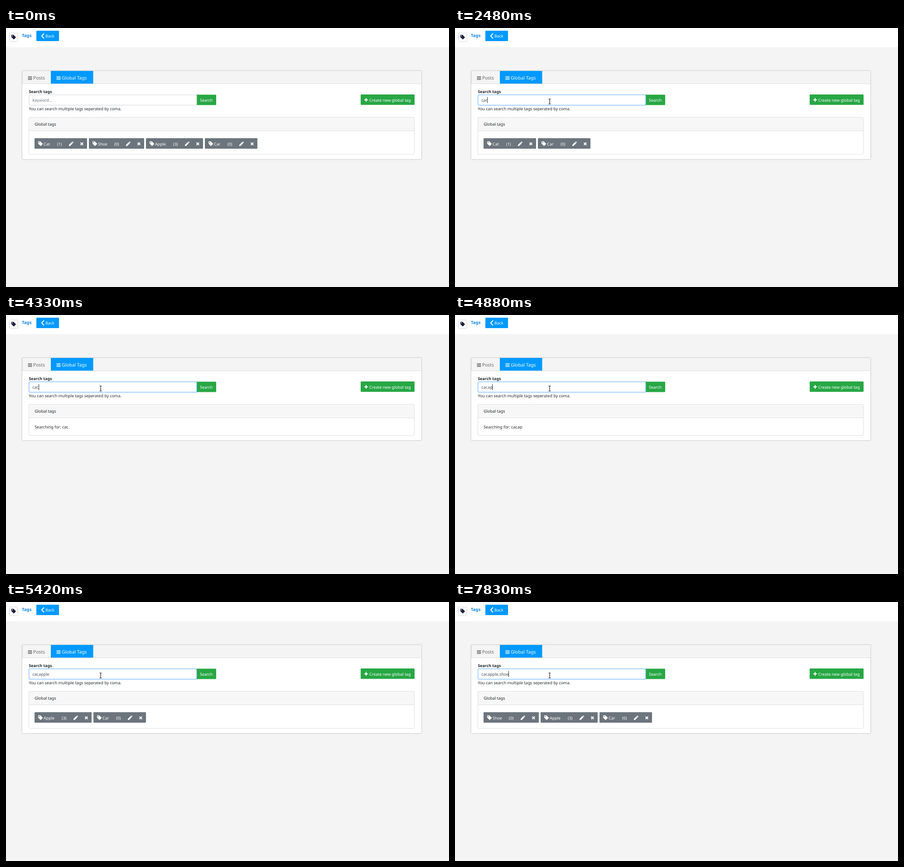
An HTML page that plays this animation: 978x573 px, repeating every 8 s.

```html
<!DOCTYPE html>
<html lang="en">
<head>
<meta charset="utf-8">
<title>Tag search</title>
<style>
  html, body { margin: 0; width: 100%; height: 100%; overflow: hidden; background: #f4f4f4; }
  svg { display: block; width: 978px; height: 573px; }
  text { font: 8.95px "Noto Sans", "Open Sans", sans-serif; fill: #212529; text-rendering: geometricPrecision; white-space: pre; }
  .bold { font-weight: 700; font-size: 8.8px; }
  .title { font-weight: 700; font-size: 9.6px; fill: #1585dc; }
  .tab { font-size: 10.2px; fill: #666; }
  .white { fill: #fff; }
  .hint { fill: #6c757d; }
  .typed { fill: #495057; }
  .line { fill: none; stroke-width: 1; stroke: #dfdfdf; }
  .blue { fill: #0099ff; }
  .green { fill: #28a745; }
  .card { fill: #fff; filter: drop-shadow(0 0.5px 1.5px rgba(0, 0, 0, .32)); }
</style>
</head>
<body>
<svg viewBox="0 0 978 573">
  <defs>
    <path id="tag" fill-rule="evenodd" d="M0 4.9V1Q0 0 1 0H4.9L9.9 5Q10.4 5.7 9.8 6.3L6.3 9.8Q5.7 10.4 5 9.9ZM2.3 1.2a1.1 1.1 0 1 0 .01 0Z"/>
    <path id="pencil" d="M0 10V7.5L6 1.5 8.5 4 2.5 10ZM6.6.9 7.3.2Q8-.2 8.6.4L9.6 1.4Q10.2 2 9.7 2.7L9.1 3.4Z"/>
    <path id="cross" d="M.8.8 6.4 6.4M6.4.8.8 6.4" fill="none" stroke="#fff" stroke-width="2.1"/>
    <path id="menu" d="M0 .7H9M0 3.7H9M0 6.7H9" fill="none" stroke-width="1.4"/>
  </defs>

  <rect width="978" height="573" fill="#f4f4f4"/>
  <rect width="978" height="42.5" fill="#fff"/>
  <rect class="card" x="8.5" y="12" width="17" height="17"/>
  <use href="#tag" x="11.7" y="15" fill="#1f1f3d"/>
  <text class="title" x="35" y="20">Tags</text>
  <rect class="blue" x="67" y="6" width="50" height="23" rx="1.5"/>
  <path d="M84 12 78.8 17.5 84 23" fill="none" stroke="#fff" stroke-width="1.9"/>
  <text class="white" x="87" y="21.3">Back</text>

  <rect class="card" id="outer" x="36" y="95" width="881" height="195"/>
  <rect x="36" y="95" width="881" height="28" fill="#f4f4f4"/>
  <path class="line" d="M36 123.5H917M36.5 95V123"/>
  <use href="#menu" x="48.5" y="107" stroke="#555"/>
  <text class="tab" x="60" y="114">Posts</text>
  <rect class="blue" x="99" y="95" width="93.5" height="28"/>
  <use href="#menu" x="111.5" y="107" stroke="#fff"/>
  <text class="tab white" x="123.3" y="114">Global Tags</text>

  <text class="bold" x="50.5" y="144.3">Search tags</text>
  <path class="green" d="M420 147.5H462.5Q464 147.5 464 149V169Q464 170.5 462.5 170.5H420Z"/>
  <text class="white" x="428" y="163.3">Search</text>
  <rect id="ring" x="49.8" y="146.8" width="372.4" height="24.9" rx="3" fill="#007bff" fill-opacity=".28"/>
  <rect id="field" x="51" y="148" width="370" height="22.5" rx="1.8" fill="#fff" stroke="#ced4da"/>
  <text class="hint" id="hint" x="58.2" y="163.3">Keyword...</text>
  <text class="typed" id="typed" x="58.3" y="163.3"></text>
  <rect id="caret" y="153" width="1" height="13" fill="#222"/>
  <text x="50.5" y="182">You can search multiple tags seperated by coma.</text>
  <rect class="green" x="783" y="147" width="119" height="23" rx="1.5"/>
  <path d="M791 159H799M795 155V163" stroke="#fff" stroke-width="2"/>
  <text class="white" x="802" y="162.8">Create new global tag</text>

  <path d="M51 227V199Q51 197.5 52.5 197.5H900Q901.5 197.5 901.5 199V227Z" fill="#f7f7f7"/>
  <path class="line" d="M51 227.5H902"/>
  <rect class="line" id="inner" x="50.5" y="197.5" width="851" height="82" rx="2"/>
  <text x="63.2" y="216.3">Global tags</text>
  <text id="status" x="63.2" y="250.9"></text>
  <g id="tags"></g>

  <g id="pointer">
    <circle id="glow" r="10" fill="#fbf04d" fill-opacity=".85"/>
    <path id="arrow" d="M0 0V14L3.3 11 5.5 16 7.6 15 5.4 10.2H10Z" fill="#fff" stroke="#000" stroke-width=".9"/>
    <path id="beam" d="M-2.5-5H-.8L0-4.4.8-5H2.5M0-4.4V5.4M-2.5 6H-.8L0 5.4.8 6H2.5" fill="none" stroke="#111" stroke-width="1.1"/>
  </g>
</svg>
<script>
const LOOP = 8000;
const $ = id => document.getElementById(id);
const show = (id, on) => $(id).style.display = on ? '' : 'none';

const tagInfo = { Cat: [116, 1], Shoe: [122, 0], Apple: [126, 3], Car: [116, 0] };
for (const [name, [w, count]] of Object.entries(tagInfo)) {
  $('tags').insertAdjacentHTML('beforeend', `<g id="tag${name}" fill="#fff">
    <rect width="${w}" height="23.2" rx="1.5" fill="#6c757d"/>
    <use href="#tag" x="8" y="7"/>
    <text class="white" x="20" y="15.9">${name}</text>
    <text class="white" x="${w - 66}" y="15.9">(${count})</text>
    <use href="#pencil" x="${w - 40}" y="7.3"/>
    <use href="#cross" x="${w - 15.2}" y="8.9"/></g>`);
}

// Each step: time, typed text, then a list of tags or the text being searched.
const all = Object.keys(tagInfo), ca = ['Cat', 'Car'];
const steps = [
  [0, '', all],
  [2010, 'c', all], [2090, 'c', 'c'], [2160, 'c', ca],
  [2240, 'ca', ca], [2320, 'ca', 'ca'], [2400, 'ca', ca],
  [2480, 'car', ca], [2550, 'car', 'car'], [2630, 'car', ['Car']],
  [3410, 'car,', ['Car']], [3470, 'car,', 'car,'],
  [3630, 'car,a', 'car,'], [3700, 'car,a', 'car,a'],
  [4020, 'car,', 'car,a'], [4100, 'car,', 'car,'],
  [4560, 'car,a', 'car,'], [4640, 'car,a', 'car,a'], [4720, 'car,a', ['Cat', 'Apple', 'Car']],
  [4800, 'car,ap', ['Cat', 'Apple', 'Car']], [4880, 'car,ap', 'car,ap'],
  [4950, 'car,app', 'car,ap'], [5030, 'car,appl', 'car,app'],
  [5110, 'car,apple', 'car,appl'], [5190, 'car,apple', 'car,apple'],
  [5420, 'car,apple', ['Apple', 'Car']],
  [6410, 'car,apple,', ['Apple', 'Car']], [6500, 'car,apple,', 'car,apple,'],
  [6660, 'car,apple,s', 'car,apple,'], [6740, 'car,apple,s', 'car,apple,s'],
  [6810, 'car,apple,sh', 'car,apple,s'], [6890, 'car,apple,sh', 'car,apple,sh'],
  [6960, 'car,apple,sho', 'car,apple,sh'], [7040, 'car,apple,sho', 'car,apple,sho'],
  [7190, 'car,apple,shoe', 'car,apple,shoe'], [7280, 'car,apple,shoe', ['Shoe', 'Apple', 'Car']]
];
const caretOff = [[0, 1650], [3100, 3410], [5190, 5720], [6270, 6410], [7280, 7830]];

const bezier = (a, b, c, d, u) => {
  const v = 1 - u;
  return a * v * v * v + 3 * b * u * v * v + 3 * c * u * u * v + d * u * u * u;
};

function pointerAt(t) {
  if (t >= 1570) return [209, 162];
  if (t >= 1490) return [210, 162];
  if (t >= 1400) return [213, 162];
  if (t >= 1320) return [225, 161];
  const u = Math.min(9, Math.floor((t - 460) / 78.8)) / 9;
  return [bezier(691, 560, 330, 245, u), bezier(388, 20, 36, 160, u)];
}

function drawPointer(t) {
  show('pointer', t >= 460);
  const [x, y] = pointerAt(Math.max(t, 460));
  const inField = x < 421 && y > 148 && y < 171;
  $('pointer').setAttribute('transform', `translate(${x} ${y})`);
  show('arrow', !inField);
  show('beam', inField);
  show('glow', t >= 1400 && t < 1650);
}

function drawField(t, typed) {
  const focus = t >= 1650 ? 1 : t >= 1570 ? 0.5 : 0;
  $('ring').style.opacity = focus;
  $('field').setAttribute('stroke', focus ? '#80bdff' : '#ced4da');
  $('typed').textContent = typed;
  show('hint', !typed);
  const end = typed ? $('typed').getComputedTextLength() : 0;
  $('caret').setAttribute('x', Math.floor(58.3 + end));
  show('caret', !caretOff.some(([a, b]) => t >= a && t < b));
}

function drawResults(view) {
  const busy = typeof view === 'string';
  $('status').textContent = busy ? 'Searching for: ' + view : '';
  $('outer').setAttribute('height', busy ? 182 : 195);
  $('inner').setAttribute('height', busy ? 69 : 82);
  let x = 63;
  for (const name of all) {
    const on = !busy && view.includes(name);
    show('tag' + name, on);
    if (!on) continue;
    $('tag' + name).setAttribute('transform', `translate(${x} 243.8)`);
    x += tagInfo[name][0] + 4;
  }
}

let last;
function frame() {
  const t = performance.now() % LOOP;
  const step = steps.findLast(s => s[0] <= t);
  if (step !== last) drawResults(step[2]);
  last = step;
  drawField(t, step[1]);
  drawPointer(t);
  requestAnimationFrame(frame);
}
frame();
</script>
</body>
</html>
```
